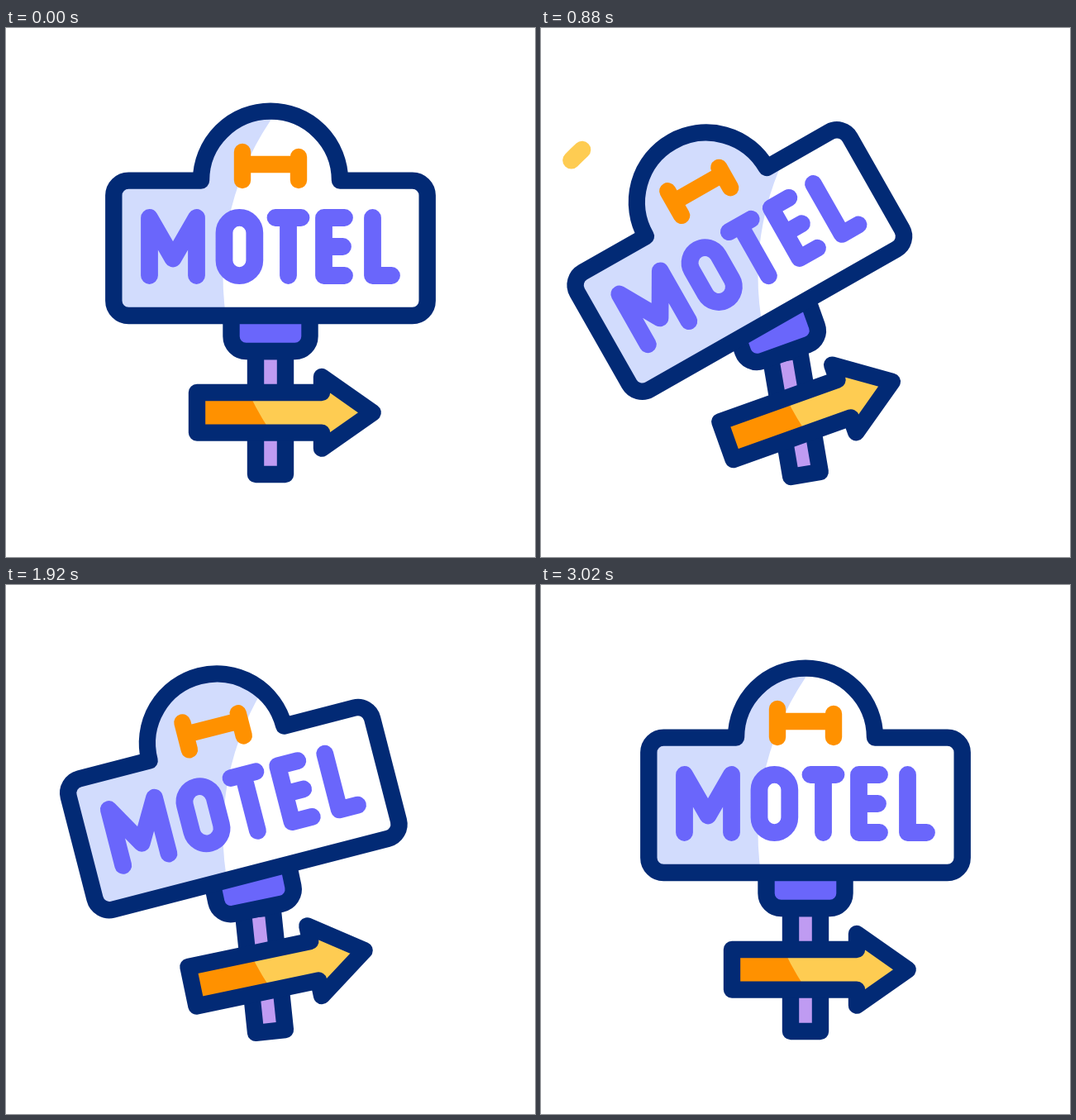
An HTML page with a canvas that plays this animation: 640 px wide and 640 px high, repeating every 3.6 s.

```html
<!DOCTYPE html>
<html lang="en">
<head>
<meta charset="utf-8">
<title>Swinging motel sign</title>
<style>
  html, body { margin: 0; width: 100%; height: 100%; overflow: hidden; background: #fff; }
  canvas { display: block; }
</style>
</head>
<body>
<canvas id="stage" width="640" height="640" role="img" aria-label="MOTEL"></canvas>
<script>
const ctx = document.getElementById('stage').getContext('2d');
const LOOP = 3600, LAG = 105, RAD = Math.PI / 180;
const NAVY = '#022a75', PURPLE = '#6a66fb', LILAC = '#bf9bf2',
      ORANGE = '#ff9100', YELLOW = '#fecc52', PALE = '#d2dcfd';

const pole = new Path2D('M302 391H338V540H302Z');
const bracket = new Path2D('M272.5 342V373a18 18 0 0 0 18 18H349.5a18 18 0 0 0 18-18V342');
const arrow = new Path2D('M231 441H382V422L443.7 465.3 382 508.6V489.6H231Z');
const board = new Path2D('M236 184.6A84 84 0 0 1 404 184.6H491.7a18 18 0 0 1 18 18V330a18 18 0 0 1-18 18' +
  'H148.3a18 18 0 0 1-18-18V202.6a18 18 0 0 1 18-18Z');
const bed = new Path2D('M286 150V184M354 156V184M286 165H354');
const letters = new Path2D(
  'M173.5 299.5V229.5L202 279 230.5 229.5V299.5' +
  'M264 247.8a18.4 18.4 0 0 1 36.8 0V281.2a18.4 18.4 0 0 1-36.8 0Z' +
  'M326 229.5H357M341.5 229.5V299.5' +
  'M409.5 229.5H384.5V299.5H409.5M384.5 264.5H407.5' +
  'M443.5 229.5V299.5H466.5');

// Everything left of one large circle, fixed on the stage
const shade = new Path2D('M0 0H640V640H0Z');
shade.moveTo(934.5, 300);
shade.arc(598.5, 300, 336, 0, 2 * Math.PI);

// Swings of one joint: start, end, angle reached
const swings = [
  [0, 580, -10], [840, 1280, 8], [1445, 1840, -6],
  [1905, 2245, 3], [2300, 2570, -1], [2620, 2800, 0]
];

const progress = (t, start, end) => Math.min(1, Math.max(0, (t - start) / (end - start)));
const easeOut = u => 1 - (1 - u) ** 2;

function bend(t) {
  let angle = 0;
  for (const [start, end, to] of swings)
    angle += (to - angle) * (1 - Math.cos(Math.PI * progress(t, start, end))) / 2;
  return angle;
}

function turn(x, y, angle) {
  ctx.translate(x, y);
  ctx.rotate(angle * RAD);
  ctx.translate(-x, -y);
}

function line(path, color, width) {
  ctx.strokeStyle = color;
  ctx.lineWidth = width;
  ctx.stroke(path);
}

function outlined(path, fill, shadow) {
  ctx.fillStyle = fill;
  ctx.fill(path);
  if (shadow) {
    ctx.save();
    ctx.clip(path);
    ctx.resetTransform();
    ctx.fillStyle = shadow;
    ctx.fill(shade, 'evenodd');
    ctx.restore();
  }
  line(path, NAVY, 20.4);
}

// A streak on the arc around the sign; angles are measured from the top
function streak(t, from, to, headStart, headEnd, tailStart, tailEnd) {
  if (t <= headStart || t >= tailEnd) return;
  const at = (start, end) => (from + (to - from) * easeOut(progress(t, start, end)) - 90) * RAD;
  const arc = new Path2D();
  arc.arc(320, 439.5, 398, at(tailStart, tailEnd), at(headStart, headEnd), to < from);
  line(arc, YELLOW, 21);
}

function draw(now) {
  const t = now % LOOP;
  const first = bend(t), second = bend(t - LAG), third = bend(t - 2 * LAG);
  ctx.resetTransform();
  ctx.fillStyle = '#fff';
  ctx.fillRect(0, 0, 640, 640);
  ctx.lineCap = ctx.lineJoin = 'round';

  streak(t, 5, -45.4, 270, 700, 312, 1050);
  streak(t, -4, 38.6, 1090, 1400, 1130, 1550);

  turn(320, 540, first);
  outlined(pole, LILAC);

  ctx.save();
  turn(337.5, 465.3, second);
  outlined(arrow, YELLOW, ORANGE);
  ctx.restore();

  turn(320, 391, second);
  ctx.lineCap = 'butt';
  outlined(bracket, PURPLE);
  ctx.lineCap = 'round';

  turn(320, 348, third);
  outlined(board, '#fff', PALE);
  line(bed, ORANGE, 20.4);
  line(letters, PURPLE, 20.8);

  requestAnimationFrame(draw);
}
requestAnimationFrame(draw);
</script>
</body>
</html>
```
